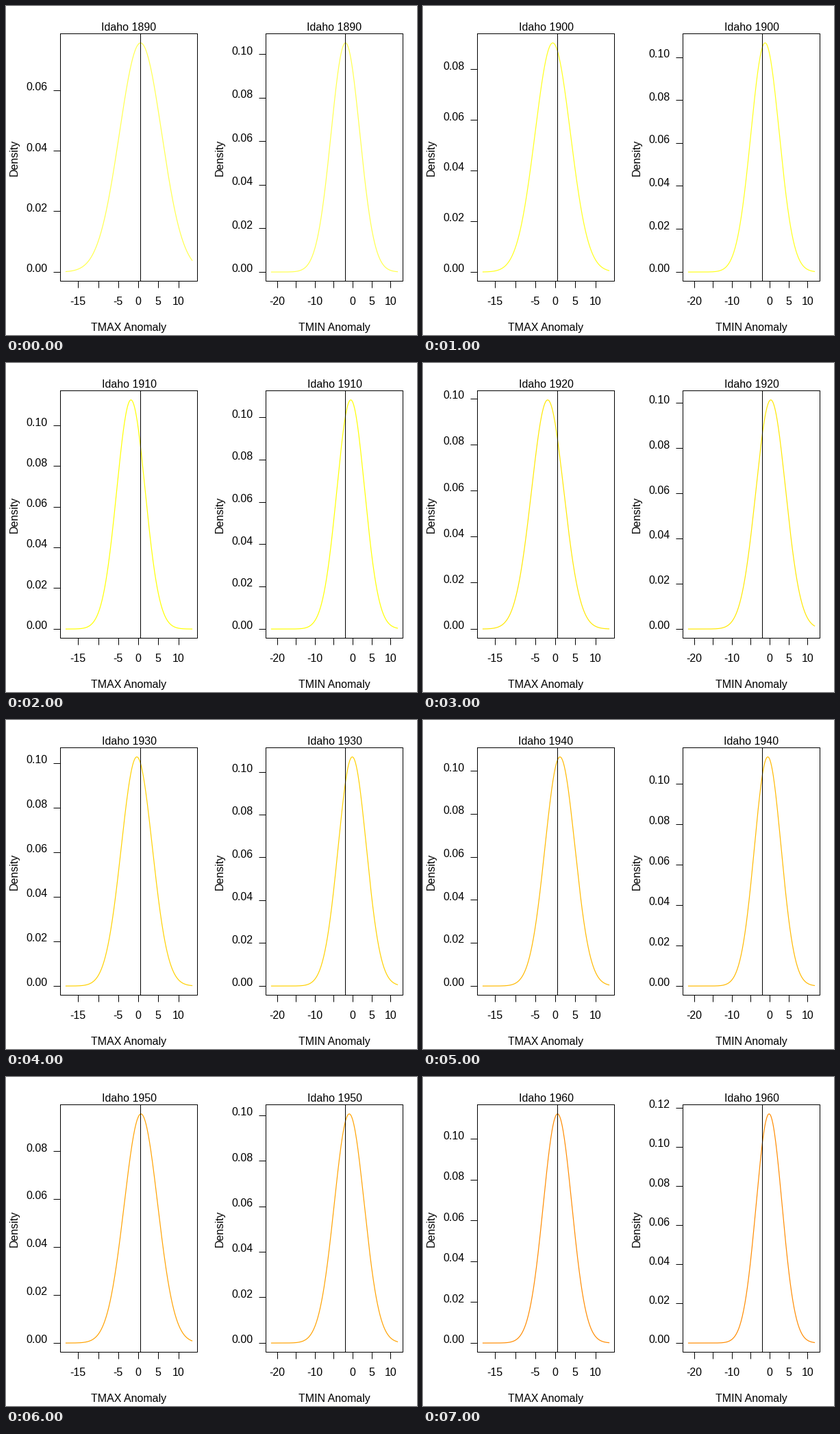
These frames come from a looping animation (600 by 480 pixels, 8 s). A matplotlib script:

```python
import colorsys

import matplotlib.pyplot as plt
import numpy as np
from matplotlib.animation import FuncAnimation

W, H, DPI = 600, 480, 100
PX = 72 / DPI  # points per pixel
FONT = 16
TOP, BOTTOM, WIDTH = 40.5, 401.5, 200
PAD = 0.04 / 1.08  # share of the box left free on each side
BASE = BOTTOM - (BOTTOM - TOP) * PAD
PEAK = TOP + (BOTTOM - TOP) * PAD
FRAMES = 8

plt.rcParams["font.family"] = "Liberation Sans"
plt.rcParams["font.size"] = FONT * PX

# Key decades, counted from 1890; the ones between are interpolated.
KEYS = [0, 2, 3, 5, 6, 7]
PANELS = {
    "TMAX": dict(span=(-18.22, 13.43),
                 mean=[0.5, -1.9, -1.97, 1.1, 0.6, 0.5],
                 sd=[5.27, 3.54, 4.01, 3.74, 4.17, 3.55]),
    "TMIN": dict(span=(-21.65, 11.84),
                 mean=[-2.0, -0.6, 0.2, -0.6, -1.0, -0.25],
                 sd=[3.79, 3.68, 3.93, 3.52, 3.96, 3.41]),
}

fig = plt.figure(figsize=(W / DPI, H / DPI), dpi=DPI, facecolor="white")
ax = fig.add_axes([0, 0, 1, 1])


def heat(i):
    """Pale yellow first, then from yellow towards red."""
    if i < 2:
        return colorsys.hsv_to_rgb(1 / 6, 0.7 + 0.2 * i, 1)
    return (1, 1 - (i - 2) / 11, 0)


def crisp(v):
    return np.floor(v) + 0.5


def line(xs, ys, color="black", width=1.0):
    ax.plot(xs, ys, color=color, lw=width * PX, snap=False,
            solid_capstyle="butt", solid_joinstyle="miter")


def label(x, y, text, **kw):
    ax.text(x, y, text, **{"ha": "center", "va": "baseline", **kw})


def text_width(number):
    return FONT * sum(0.333 if c == "-" else 0.556 for c in number)


def x_axis(to_x, lo, hi):
    """Ticks every 5 degrees; a label too close to the last one is left out."""
    last = -np.inf
    for v in range(5 * int(np.ceil(lo / 5)), int(hi) + 1, 5):
        x, text = to_x(v), str(v)
        line([crisp(x)] * 2, [BOTTOM, BOTTOM + 10])
        half = text_width(text) / 2
        if x - half - last > 0.833 * FONT:
            label(x - 0.5, 436, text)
            last = x + half


def y_axis(left, peak):
    for v in np.arange(0, peak * 1.04, 0.02):
        y = BASE - (BASE - PEAK) * v / peak
        line([left - 10, left], [crisp(y)] * 2)
        label(left - 19.3, y, f"{v:.2f}", ha="right")


def draw_panel(left, name, span, mean, sd, i):
    lo, hi = span
    right, mid = left + WIDTH, left + WIDTH / 2
    mu, sigma = np.interp(i, KEYS, mean), np.interp(i, KEYS, sd)

    def to_x(v):
        return left + WIDTH * (PAD + (1 - 2 * PAD) * (v - lo) / (hi - lo))

    v = np.linspace(lo, hi, 300)
    bell = np.exp(-((v - mu) / sigma) ** 2 / 2)
    line(to_x(v), BASE - (BASE - PEAK) * bell, heat(i), 1.2)

    # The upright marks the mean of the first decade.
    line([crisp(to_x(mean[0]))] * 2, [TOP, BOTTOM])
    line([left, right, right, left, left, right],
         [TOP, TOP, BOTTOM, BOTTOM, TOP, TOP])
    x_axis(to_x, lo, hi)
    y_axis(left, 1 / (sigma * np.sqrt(2 * np.pi)))

    label(mid, 36, f"Idaho {1890 + 10 * i}")
    label(mid, 474, f"{name} Anomaly")
    label(left - 62.5, 221, "Density", rotation=90, rotation_mode="anchor")


def update(i):
    ax.clear()
    ax.set(xlim=(0, W), ylim=(H, 0))
    ax.axis("off")
    for k, (name, panel) in enumerate(PANELS.items()):
        draw_panel(79.5 + 300 * k, name, i=i, **panel)


anim = FuncAnimation(fig, update, frames=FRAMES, interval=1000,
                     init_func=lambda: update(0), repeat=True, repeat_delay=0)
plt.show()
```
